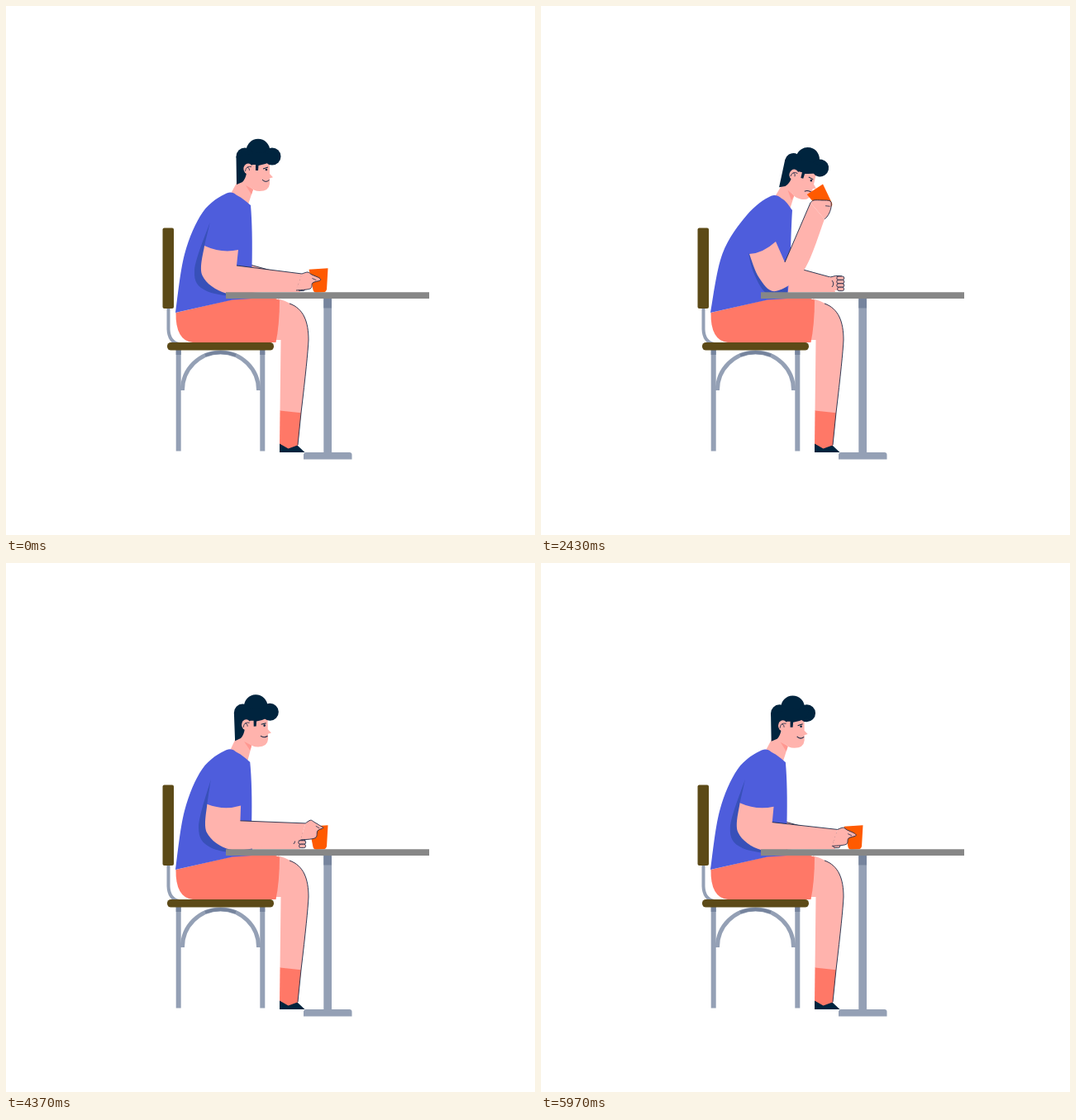
These frames come from a looping animation (640x640 px, 6.01 s). An HTML page with a canvas:

```html
<!DOCTYPE html>
<html lang="en">
<head>
<meta charset="utf-8">
<title>Coffee break</title>
<style>
  html, body { margin: 0; width: 100%; height: 100%; overflow: hidden; background: #fff; }
  canvas { display: block; width: 640px; height: 640px; }
</style>
</head>
<body>
<canvas id="stage" width="640" height="640"></canvas>
<script>
const ctx = document.getElementById('stage').getContext('2d');
const LOOP = 6010, FRAMES = 180;
const C = {
  skin: '#ffb3ad', blush: '#ff9891', coral: '#ff7867', shirt: '#4e5ddc', shade: '#3850b9',
  navy: '#00243e', line: '#1c2b48', cup: '#ff5a00', wood: '#5c4a17',
  metal: '#94a0b5', metalDark: '#76849d', table: '#878787'
};

// Hand outlines run from the upper wrist round the fingers to the lower wrist.
const grip = [[-4, -9], [1, -12], [9, -11], [19, -12], [20, -7], [15, 1], [13, 8], [2, 11]];
const rest = {
  head: [293, 197, 0], nape: [267, 226.5], collar: [296, 241],
  hem: [240, 290], cuff: [281, 295], crook: [279, 314],
  outer: [237.5, 326], elbow: [266, 347.5], under: [310, 346],
  apex: [247, 261], shade: [228, 320],
  cup: [379, 332, -4], hand: [361, 334],
  fingers: [[-3, -10], [4, -12], [9, -9], [18, -5], [19, -2], [10, 1], [7, 8], [-10, 10]],
  mood: [0], fist: [-5]
};
const lift = {
  head: [299, 199, 5.5], nape: [273, 228], collar: [299, 243],
  hem: [251, 298], cuff: [289, 287], crook: [294, 310],
  outer: [257, 328], elbow: [277, 346], under: [310, 337],
  apex: [249, 282], shade: [249, 318],
  cup: [376, 267, -28], hand: [361, 279], fingers: grip, mood: [1], fist: [0]
};
const drink = {
  head: [306, 204, 13], nape: [278, 230], collar: [304, 247],
  hem: [252, 300], cuff: [284, 285], crook: [295, 310],
  outer: [264, 329], elbow: [284, 345], under: [318, 320],
  apex: [251, 299], shade: [257, 322],
  cup: [339, 233.5, -33], hand: [331, 248],
  fingers: [[-5, -10], [-1, -13], [9, -13], [19, -12], [20, -5], [18, 2], [15, 7], [12, 10]],
  mood: [1], fist: [0]
};
const lower = {
  head: [302, 201, 7.5], nape: [275, 229], collar: [301, 244],
  hem: [247, 297], cuff: [284, 289], crook: [289, 314],
  outer: [252, 328], elbow: [272, 347], under: [308, 334],
  apex: [246, 288], shade: [247, 320],
  cup: [364, 264.5, -26], hand: [349, 277], fingers: grip, mood: [1], fist: [0]
};
const thumb = {
  head: [281, 191, -6.4], nape: [264, 225.5], collar: [292, 240],
  hem: [257, 299], cuff: [297, 287], crook: [302, 303],
  outer: [266, 327], elbow: [290, 342], under: [326, 332],
  apex: [251, 266], shade: [254, 318],
  cup: rest.cup, hand: [386, 287],
  fingers: [[-6, -10], [-3, -21], [0, -21], [3, -13], [13, -14], [16, -9], [13, 7], [-7, 10]],
  mood: [1], fist: [0]
};

const easeIn = u => 1 - Math.cos(u * Math.PI / 2);
const easeOut = u => Math.sin(u * Math.PI / 2);
const easeBoth = u => (1 - Math.cos(u * Math.PI)) / 2;

// start, end, from, to, easing, sideways swing of the hand
const moves = [
  [0, 570, rest, lift, easeIn, 9],
  [570, 1200, lift, drink, easeOut, 0],
  [1200, 2400, drink, drink, easeIn, 0],
  [2400, 2770, drink, lower, easeIn, 0],
  [2770, 3200, lower, rest, easeOut, 0],
  [3200, 4200, rest, rest, easeIn, 0],
  [4200, 4800, rest, thumb, easeBoth, 0],
  [4800, 5740, thumb, thumb, easeIn, 0],
  [5740, 5970, thumb, rest, easeBoth, 0],
  [5970, LOOP, rest, rest, easeIn, 0]
];

const mix = (a, b, u) => Array.isArray(a) ? a.map((v, i) => mix(v, b[i], u)) : a + (b - a) * u;

function poseAt(time) {
  const [start, end, from, to, ease, swing] = moves.find(m => time < m[1]) || moves[moves.length - 1];
  const u = ease((time - start) / (end - start));
  const pose = {};
  for (const key in from) pose[key] = mix(from[key], to[key], u);
  const shift = swing * Math.sin(Math.PI * u);
  pose.cup[0] += shift;
  pose.hand[0] += shift;
  return pose;
}

// Smooth curve through the points, continuing the given path.
function curve(path, pts) {
  pts.slice(0, -1).forEach((p, i) => {
    const before = pts[i - 1] || p, q = pts[i + 1], after = pts[i + 2] || q;
    path.bezierCurveTo(
      p[0] + (q[0] - before[0]) / 6, p[1] + (q[1] - before[1]) / 6,
      q[0] - (after[0] - p[0]) / 6, q[1] - (after[1] - p[1]) / 6, q[0], q[1]);
  });
}
function fill(shape, color) {
  ctx.fillStyle = color;
  ctx.fill(typeof shape === 'string' ? new Path2D(shape) : shape);
}
function stroke(shape, color = C.line, width = 0.9) {
  ctx.strokeStyle = color;
  ctx.lineWidth = width;
  ctx.stroke(typeof shape === 'string' ? new Path2D(shape) : shape);
}
function box(x, y, w, h, color, radius = 0) {
  ctx.beginPath();
  ctx.roundRect(x, y, w, h, radius);
  ctx.fillStyle = color;
  ctx.fill();
}
function disc(x, y, rx, color, ry = rx) {
  ctx.beginPath();
  ctx.ellipse(x, y, rx, ry, 0, 0, Math.PI * 2);
  ctx.fillStyle = color;
  ctx.fill();
}
function placed([x, y, degrees = 0], draw) {
  ctx.save();
  ctx.translate(x, y);
  ctx.rotate(degrees * Math.PI / 180);
  draw();
  ctx.restore();
}

function drawChair() {
  stroke('M196.5 365V391Q197 406 209 409', C.metal, 4);
  stroke('M213.5 465V464.5A46 45.5 0 0 1 305.5 464.5V465', C.metal, 5);
  stroke('M241 422.5Q259.5 415.5 278 422.5', C.metalDark, 4);
  for (const x of [205.7, 307.3]) {
    box(x, 416, 6, 122.5, C.metal);
    box(x, 416, 6, 6, C.metalDark);
  }
  box(189.5, 268.5, 13.5, 97.5, C.wood, 2);
}

function drawLegs() {
  fill('M329 354Q336 356 344 360C360 366 366 382 366 404Q365 425 357 493L331.5 490L332.5 404H327Z', C.skin);
  fill('M331.5 489.5L357 492.3L353 532L342 537L331 532Z', C.coral);
  fill('M331 529.5L341.5 535.5L352.5 531.5L361.5 540H331Z', C.navy);
  stroke('M343 360C360 366 366 382 366 404Q365 425 357 492L353 531');
  fill('M205.5 371L274 355L300 353H324L331 356Q331 385 326.5 407H226Q205 405 205.5 371Z', C.coral);
  box(195, 407, 129, 9.5, C.wood, 4.5);
}

function drawBackArm(shift) {
  fill('M292 312L350 328L356 346H292Z', C.skin);
  stroke('M297 313.5L350 328');
  placed([shift, 0], () => {
    fill('M349 328Q356 325.5 364 327L366 344H349Z', C.skin);
    stroke('M350 328Q356 325.5 364 326.8M352 332Q355.5 336 352 340');
    for (let i = 0; i < 4; i++) {
      ctx.beginPath();
      ctx.roundRect(357.8 + (i === 3 ? 0.8 : 0), 327 + i * 4.4, i === 3 ? 8 : 9, 4.4, 2.2);
      ctx.fillStyle = C.skin;
      ctx.fill();
      stroke(new Path2D(), C.line);
      ctx.stroke();
    }
  });
}

function drawNeck({ head, nape, collar }) {
  const a = head[2] * Math.PI / 180;
  const at = (x, y) => [head[0] + x * Math.cos(a) - y * Math.sin(a), head[1] + x * Math.sin(a) + y * Math.cos(a)];
  const poly = (...pts) => new Path2D('M' + pts.map(p => p.join(' ')).join('L') + 'Z');
  fill(poly(at(-9, 8), at(6, 25), [collar[0] - 3, collar[1] - 1], [collar[0] - 8, collar[1] + 4], [nape[0] + 3, nape[1] + 4]), C.skin);
  fill(poly(at(-3, 20), at(6, 25), at(4, 31)), C.blush);
}

function drawHead({ head, mood: [m] }) {
  placed(head, () => {
    fill('M-5 -9H26V6L30 10.3L26 11.5V18Q25 27 14 27Q6 27 3 22L-9 13Z', C.skin);
    disc(12, -22, 14.3, C.navy);
    disc(29, -15, 10.5, C.navy);
    disc(-4, -15, 10.5, C.navy);
    fill('M-14.5 -15L-14 19L-7 16Q-3 12 -2 5L5 -5L9 -5L9 2H12L12.5 -4Q20 -5 28 -9L32 -18L12 -20Z', C.navy);
    disc(0, 0, 5.6, C.skin, 6.5);
    stroke('M-3.5 3Q-3 -4 4 -2.5M-1 -2Q2 -1 1.5 2', C.line, 0.8);
    disc(22, 1 + m * 1.3, 1.3, C.navy);
    stroke(`M18 ${-m * 1.2}L24 ${-2 + m * 2.5}`, C.navy, 1);
    stroke(`M17 ${13 + m * 3.8}Q21 ${17.5 - m * 3.3} 25.5 ${13.5 + m * 2.5}`, C.line, 1);
  });
}

function drawTorso({ nape, collar, hem, apex, shade }) {
  const front = collar[0] / 2 + 149.5;
  const body = new Path2D('M205 371');
  curve(body, [[205, 371], [nape[0] * 0.3 + 136, 300], [nape[0] - 29, nape[1] + 23],
    nape, [nape[0] + 15, nape[1] + 4], collar]);
  body.quadraticCurveTo(front + 1, 270, front, 316);
  body.lineTo(298, 354);
  body.lineTo(274, 355.5);
  body.closePath();
  fill(body, C.shirt);

  const shadow = new Path2D();
  shadow.moveTo(...apex);
  curve(shadow, [apex, shade, [shade[0] + 15, shade[1] + 25], [298, 354]]);
  shadow.lineTo(298, 335);
  shadow.lineTo(...hem);
  shadow.closePath();
  ctx.save();
  ctx.clip(body);
  fill(shadow, C.shade);
  ctx.restore();
}

function drawArm({ hem, cuff, crook, outer, elbow, under, hand, fingers }) {
  const tips = fingers.map(([x, y]) => [x + hand[0], y + hand[1]]);
  const arm = new Path2D();
  arm.moveTo(...hem);
  curve(arm, [hem, outer, elbow, under, tips[7]]);
  arm.lineTo(...tips[0]);
  arm.lineTo(...crook);
  arm.lineTo(...cuff);
  arm.quadraticCurveTo((hem[0] + cuff[0]) / 2, (hem[1] + cuff[1]) / 2 + 7, ...hem);
  fill(arm, C.skin);

  const outline = new Path2D();
  outline.moveTo(...tips[0]);
  curve(outline, tips);
  fill(outline, C.skin);
  stroke(outline);
  const edge = new Path2D();
  edge.moveTo(...crook);
  edge.lineTo(...tips[0]);
  stroke(edge);
  const crease = new Path2D();
  crease.moveTo(...mix(tips[2], tips[5], 0.45));
  crease.lineTo(...mix(tips[3], tips[5], 0.45));
  stroke(crease, C.line, 0.8);
}

function drawCup({ cup }) {
  placed(cup, () => fill('M-11.5 -14H11.5L8.3 11Q7.5 14.5 4 14.5H-4Q-7.5 14.5 -8.3 11Z', C.cup));
}

function drawTable() {
  box(384.3, 354, 9.7, 186, C.metal);
  box(384.3, 354, 9.7, 11.5, C.metalDark);
  box(360, 540, 58.5, 8.5, C.metal, [3, 3, 0, 0]);
  box(266, 346.3, 246, 7.8, C.table);
}

function render(now) {
  const frame = Math.floor((now % LOOP) / LOOP * FRAMES + 0.1);
  const pose = poseAt(frame * LOOP / FRAMES);
  ctx.fillStyle = '#fff';
  ctx.fillRect(0, 0, 640, 640);
  drawChair();
  drawLegs();
  drawBackArm(pose.fist[0]);
  drawNeck(pose);
  drawHead(pose);
  drawTorso(pose);
  drawCup(pose);
  drawArm(pose);
  drawTable();
}

const begin = performance.now();
function tick() {
  render(performance.now() - begin);
  requestAnimationFrame(tick);
}
tick();
</script>
</body>
</html>
```
